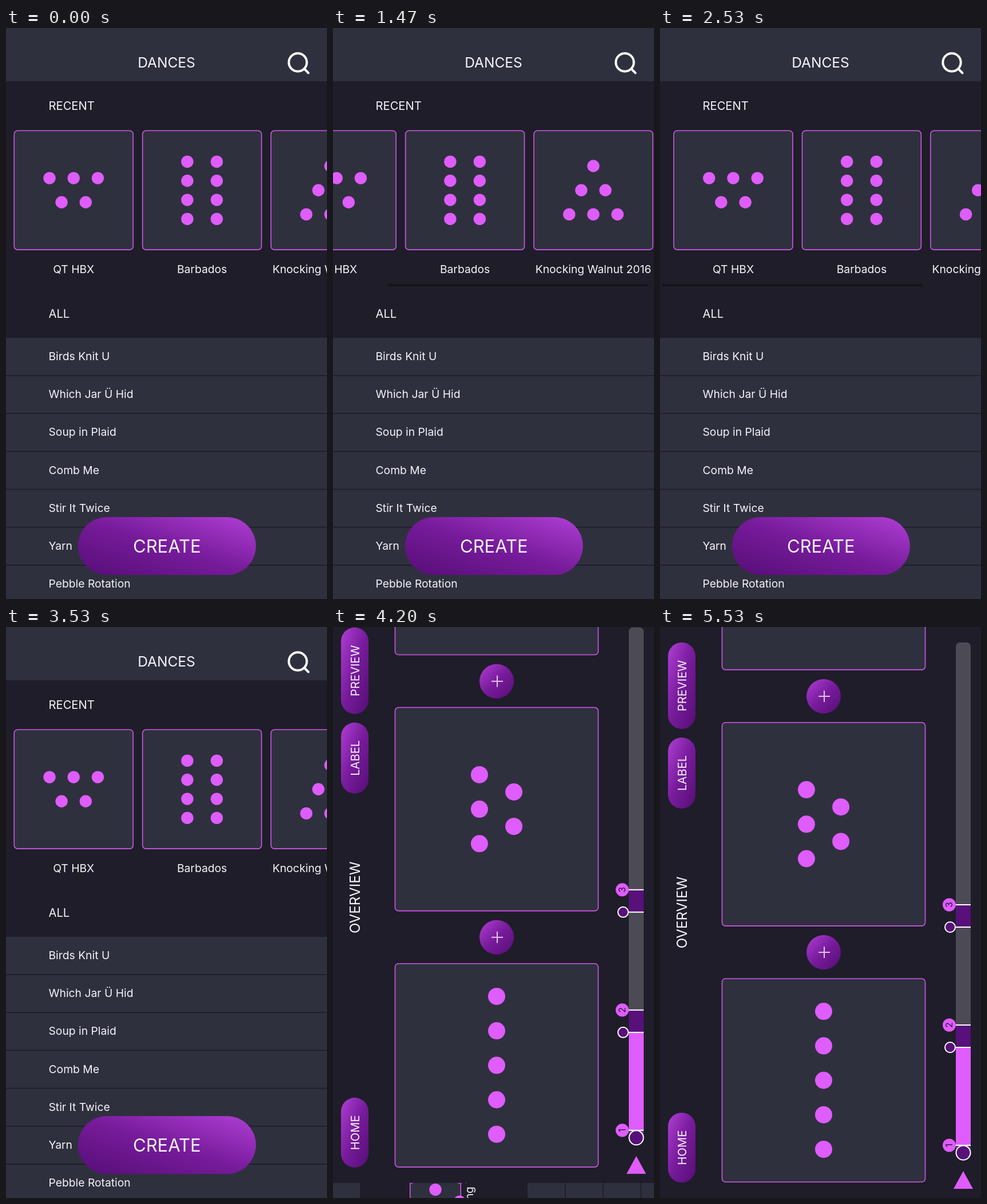
Recreate the animation shown at these times as an HTML page with a canvas. Size 561 px wide and 997 px high, loop 5.59 s.

```html
<!DOCTYPE html>
<html lang="en">
<head>
<meta charset="utf-8">
<title>Dances</title>
<style>
  html, body { margin: 0; width: 100%; height: 100%; overflow: hidden; background: #000; }
  canvas { display: block; width: 561px; height: 997px; }
</style>
</head>
<body>
<canvas id="stage"></canvas>
<script>
const W = 561, H = 997, LOOP = 5590, STEP = 200 / 3;
const PANEL = '#2f303e', DARK = '#1f1d29', PINK = '#df5cfd', PLUM = '#58107a', EDGE = '#cf58ea';

const canvas = document.getElementById('stage');
const dpr = window.devicePixelRatio || 1;
canvas.width = W * dpr;
canvas.height = H * dpr;
const c = canvas.getContext('2d');

const SONGS = ['Birds Knit U', 'Which Jar Ü Hid', 'Soup in Plaid', 'Comb Me',
  'Stir It Twice', 'Yarn', 'Pebble Rotation'];

// Formations: dot offsets in grid units from the card centre
const VEE = [[-1, -.5], [0, -.5], [1, -.5], [-.5, .5], [.5, .5]];
const COLUMNS = [-1.18, -.39, .4, 1.19].flatMap(y => [[-.61, y], [.61, y]]);
const PYRAMID = [[0, -1], [-.5, 0], [.5, 0], [-1, 1], [0, 1], [1, 1]];
const LINE = [-2, -1, 0, 1, 2].map(x => [x, 0]);
const DANCES = [['QT HBX', VEE], ['Barbados', COLUMNS], ['Knocking Walnut 2016', PYRAMID]];

const PORTRAIT = { w: W, h: H, head: 93, title: 60, size: 209.4, top: 178.5,
  xs: [13.5, 237.9, 462.3], label: 421, list: 541 };
const LANDSCAPE = { w: H, h: W, head: 47, title: 24, size: 90, top: 134,
  xs: [14, 119, 282], label: 238, list: 340 };

// Timing helpers
const clamp = u => Math.max(0, Math.min(1, u));
const smooth = u => { u = clamp(u); return u * u * (3 - 2 * u); };
const quad = u => { u = clamp(u); return u < .5 ? 2 * u * u : 1 - 2 * (1 - u) ** 2; };

function track(t, keys) {
  let value = keys[0][1];
  for (let i = 1; i < keys.length; i++) {
    const [t0, a] = keys[i - 1], [t1, b] = keys[i];
    if (t >= t0) value = a + (b - a) * smooth((t - t0) / (t1 - t0));
  }
  return value;
}

const press = (t, down, up) =>
  1 - .8 * (quad((t - down) / 150) - quad((t - up) / 250));

// Drawing helpers
function rect(x, y, w, h, fill) {
  c.fillStyle = fill;
  c.fillRect(x, y, w, h);
}

function rounded(x, y, w, h, r) {
  c.beginPath();
  c.roundRect(x, y, w, h, r);
}

function disc(x, y, r, fill, stroke) {
  c.beginPath();
  c.arc(x, y, r, 0, 7);
  c.fillStyle = fill;
  c.fill();
  if (stroke) {
    c.strokeStyle = stroke;
    c.lineWidth = 2;
    c.stroke();
  }
}

function line(x0, y0, x1, y1, width, color) {
  c.beginPath();
  c.moveTo(x0, y0);
  c.lineTo(x1, y1);
  c.lineWidth = width;
  c.strokeStyle = color;
  c.stroke();
}

function text(s, x, y, size, align = 'center', color = '#f6f4fa') {
  c.font = `400 ${size}px Inter, Roboto, sans-serif`;
  c.textAlign = align;
  c.fillStyle = color;
  c.fillText(s, x, y + size * .364);
}

// The shading runs from the top right corner, parallel to the other diagonal
function button(x, y, w, h, label, size) {
  const cx = x + w / 2, cy = y + h / 2, k = w * h / (w * w + h * h);
  const g = c.createLinearGradient(cx + h * k, cy - w * k, cx - h * k, cy + w * k);
  g.addColorStop(0, '#b03fd5');
  g.addColorStop(.5, '#771b9b');
  g.addColorStop(1, '#560e76');
  rounded(x, y, w, h, h / 2);
  c.fillStyle = g;
  c.fill();
  if (label) text(label, cx, cy + .5, size);
}

function card(x, y, size, dots, gap, r) {
  rounded(x + .75, y + .75, size - 1.5, size - 1.5, 6);
  c.fillStyle = PANEL;
  c.fill();
  c.strokeStyle = EDGE;
  c.lineWidth = 1.6;
  c.stroke();
  for (const [dx, dy] of dots)
    disc(x + size / 2 + dx * gap, y + size / 2 + dy * gap, r, PINK);
}

// Screen with the recent cards and the list of dances
function home(m, scroll, alphas, bar) {
  rect(0, 0, m.w, m.h, DARK);
  rect(0, 0, m.w, m.head, PANEL);
  text('DANCES', m.w / 2, m.title, 24.5);
  c.lineCap = 'round';
  c.beginPath();
  c.arc(m.w - 51, m.title, 15.7, 0, 7);
  c.strokeStyle = '#fff';
  c.lineWidth = 4;
  c.stroke();
  line(m.w - 39, m.title + 12, m.w - 32.5, m.title + 18.5, 4, '#fff');
  c.lineCap = 'butt';

  text('RECENT', 74.5, m.head + 43, 20.2, 'left');
  DANCES.forEach(([name, dots], i) => {
    const x = m.xs[i] - scroll;
    c.globalAlpha = alphas[i];
    card(x, m.top, m.size, dots, 42.2, 10.7);
    c.globalAlpha = 1;
    text(name, x + m.size / 2, m.label, 19.3);
  });
  if (bar) {
    c.globalAlpha = bar;
    rounded(10 + .76 * scroll, 447, 457, 4, 2);
    c.fillStyle = '#15121b';
    c.fill();
    c.globalAlpha = 1;
  }

  text('ALL', 74.5, m.list - 42, 20.2, 'left');
  rect(0, m.list, m.w, m.h - m.list, PANEL);
  SONGS.forEach((song, i) => {
    const y = m.list + i * 66.2;
    if (i) rect(0, y - 1.2, m.w, 1.8, DARK);
    text(song, 74.5, y + 32, 19.3, 'left');
  });
  button(m.w / 2 + .8 - 155.5, m.h - 143, 311, 101, 'CREATE', 31);
}

// Screen with the formations and the timeline
function overview() {
  rect(0, 0, H, W, DARK);
  button(27, 14, 122, 48, 'HOME', 20.2);
  button(680, 14, 124, 48, 'LABEL', 20.2);
  button(819, 14, 151, 48, 'PREVIEW', 20.2);
  text('OVERVIEW', H / 2, 38.5, 24.2);

  [LINE, VEE, []].forEach((dots, i) => card(27.2 + i * 447.2, 107.7, 356.6, dots, 60.2, 15));
  for (const x of [429, 876]) {
    button(x - 30, 256, 60, 60);
    line(x - 10, 287, x + 10, 287, 2, '#d8c8e0');
    line(x, 277, x, 297, 2, '#d8c8e0');
  }

  rounded(79, 517, 891, 26, [0, 7, 7, 0]);
  c.fillStyle = '#4c4b55';
  c.fill();
  rect(92, 517, 171, 26, PINK);
  for (const x of [263, 473]) {
    rect(x, 517, 39, 26, PLUM);
    line(x, 516, x, 543, 2, '#fff');
    disc(x, 507, 9, PLUM, '#fff');
  }
  [92, 302, 512].forEach((x, i) => {
    line(x, 516, x, 543, 2, '#fff');
    disc(x, 505.5, 11.5, PINK);
    text(i + 1, x, 505.5, 15.5, 'center', '#2a1236');
  });
  disc(79, 530, 12.5, PLUM, '#fff');

  c.beginPath();
  c.moveTo(47, 530);
  c.lineTo(16, 513);
  c.lineTo(16, 547);
  c.fillStyle = PINK;
  c.fill();
}

function turned(t) {
  const p = smooth((t - 3801) / 294);
  const w = W + (H - W) * p, h = H - (H - W) * p;
  c.translate(W / 2, H / 2);
  c.rotate(-p * Math.PI / 2);
  c.translate(-w / 2, -h / 2);
  rect(0, 0, w, h, '#fff');
  c.beginPath();
  c.rect(0, 0, H, W);
  c.clip();

  // Critically damped push; the old screen trails at 30 %
  const x = Math.max(0, t - 3902) * .0185;
  const push = 1 - (1 + x) * Math.exp(-x);
  c.save();
  c.translate(-.3 * H * push, 0);
  home(LANDSCAPE, 0, [1, 1, 1], 0);
  c.restore();
  c.translate(H * (1 - push), 0);
  overview();
}

function draw(t) {
  c.setTransform(dpr, 0, 0, dpr, 0, 0);
  rect(0, 0, W, H, '#000');
  c.save();
  if (t > 3801) {
    turned(t);
  } else {
    const scroll = track(t, [[790, 0], [1000, 135], [1270, 112], [2030, 112], [2330, -23], [2700, 0]]);
    const alphas = [press(t, 3070, 3260), press(t, 1800, 2060), press(t, 700, 916)];
    const bar = track(t, [[790, 0], [860, 1], [1500, 1], [1750, 0], [1930, 0], [1990, 1], [2700, 1], [2950, 0]]);
    home(PORTRAIT, scroll, alphas, bar);
  }
  c.restore();
}

// The picture advances fifteen times a second
const start = performance.now();
function tick() {
  const t = (performance.now() - start) % LOOP;
  draw(Math.floor((t + 3.4) / STEP) * STEP);
  requestAnimationFrame(tick);
}
tick();
</script>
</body>
</html>
```
